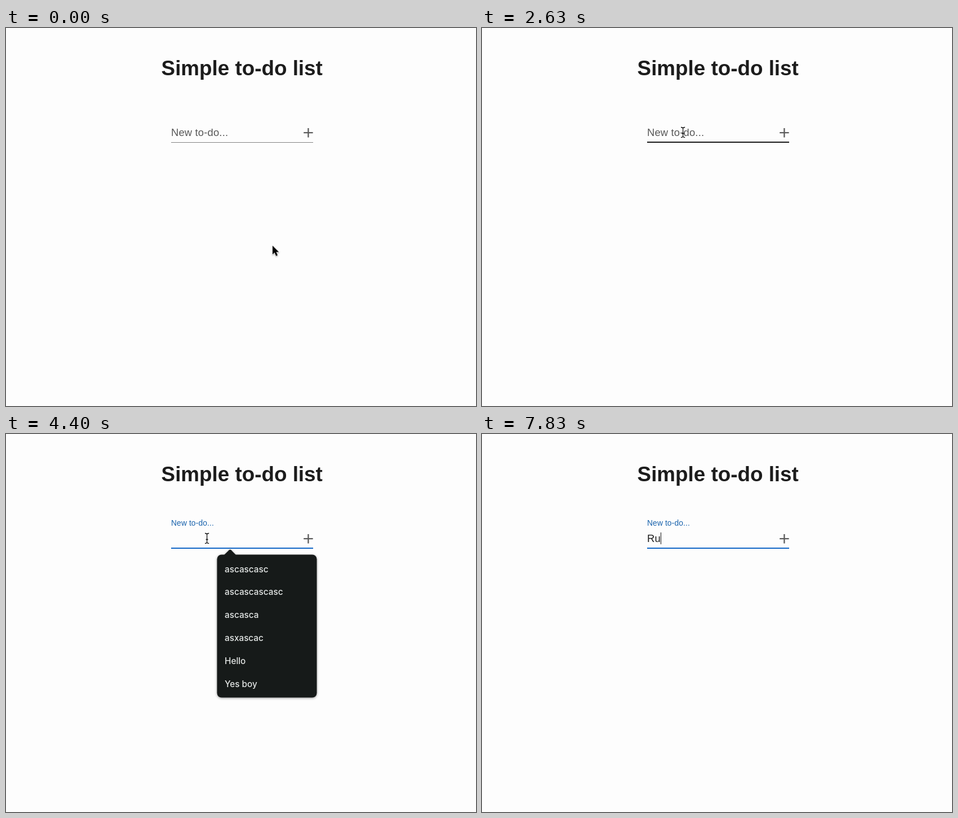
Write an HTML page that moves like this. It is 834 by 672 pixels and loops after 8000 ms.

```html
<!DOCTYPE html>
<html lang="en">
<head>
<meta charset="utf-8">
<title>Simple to-do list</title>
<style>
  html, body { margin: 0; width: 100%; height: 100%; overflow: hidden; background: #fdfdfd; }
  svg { display: block; font-family: "Liberation Sans", Arial, sans-serif; }
  .field { font-size: 18.4px; letter-spacing: 0.00938em; }
  .menu { font: 500 15.3px Inter, sans-serif; fill: #e4e7e6; }
  #popup { filter: drop-shadow(0 1px 2px rgba(0, 0, 0, .4)); }
  #arrow { filter: drop-shadow(0 1px 1px rgba(0, 0, 0, .35)); }
</style>
</head>
<body>
<svg width="834" height="672" viewBox="0 0 834 672">
  <text x="275.6" y="84" font-size="36.8" font-weight="700" fill="#1c1c1c">Simple to-do list</text>

  <text id="label" class="field" y="19.6">New to-do...</text>
  <text id="typed" class="field" x="293" y="192" fill="#1c1c1c"></text>
  <rect id="caret" y="175" width="1" height="21" fill="#111"/>
  <path d="M528.2 186.2h16.4M536.4 178v16.4" stroke="#5c5c5c" stroke-width="2.3"/>
  <rect id="line" x="293" width="252"/>
  <rect id="focusLine" y="202" height="2" fill="#1166c6"/>

  <g id="popup">
    <rect x="374.5" y="214.5" width="177" height="254" rx="8" fill="#161a19"/>
    <path d="M386.5 215.5L396 206.3q1.700-1.500 3.400 0L408.500 215.500z" fill="#161a19"/>
    <g id="items" class="menu"></g>
  </g>

  <path id="arrow" d="M0 0V15.600L3.600 12.300L6.200 18.200L9 17L6.500 11.300H11.200Z"
        fill="#000" stroke="#fff" stroke-width="1.2" paint-order="stroke"/>
  <path id="beam" d="M353 176.500q3.600 0 3.600 2.500V192q0 2.500-3.600 2.500M360.200 176.500q-3.600 0-3.600 2.500M356.600 192q0 2.500 3.600 2.500M354.600 187.500h4"
        fill="none" stroke="#111" stroke-width="1.3"/>
</svg>
<script>
const LOOP = 8000, HOVER = 2430, FOCUS = 2875, TYPE_R = 5565, TYPE_U = 7740;
const LEFT = 293, RIGHT = 545;
// time, x, y of the pointer tip
const POINTER = [
  [30, 473, 387], [200, 467, 370], [850, 414, 251],
  [970, 407, 238], [1300, 365, 187], [1500, 357, 178]
];
const $ = id => document.getElementById(id);
const clamp = v => Math.min(1, Math.max(0, v));
const mix = (a, b, p) => a + (b - a) * p;
const mixColor = (a, b, p) => `rgb(${a.map((v, i) => Math.round(mix(v, b[i], p)))})`;
const show = (id, on) => $(id).setAttribute('visibility', on ? 'visible' : 'hidden');
const set = (id, attrs) => {
  for (const name in attrs) $(id).setAttribute(name, attrs[name]);
};

['ascascasc', 'ascascascasc', 'ascasca', 'asxascac', 'Hello', 'Yes boy'].forEach((word, i) => {
  const item = document.createElementNS('http://www.w3.org/2000/svg', 'text');
  item.textContent = word;
  item.setAttribute('x', 388);
  item.setAttribute('y', 245.500 + i * 40.800);
  $('items').append(item);
});

// cubic-bezier(0, 0, 0.2, 1)
function easeOut(x) {
  let low = 0, high = 1;
  for (let i = 0; i < 20; i++) {
    const s = (low + high) / 2;
    if (0.6 * s * s * (1 - s) + s ** 3 < x) low = s; else high = s;
  }
  return 3 * low * low * (1 - low) + low ** 3;
}

function pointerAt(t) {
  let i = 0;
  while (i < POINTER.length - 2 && t > POINTER[i + 1][0]) i++;
  const [t0, x0, y0] = POINTER[i], [t1, x1, y1] = POINTER[i + 1];
  const p = clamp((t - t0) / (t1 - t0));
  return [mix(x0, x1, p), mix(y0, y1, p)];
}

function draw(t) {
  const hovered = t >= HOVER, focused = t >= FOCUS;
  const focus = easeOut(clamp((t - FOCUS) / 200));
  const hover = clamp((t - HOVER) / 200);

  set('label', {
    transform: `translate(${LEFT} ${mix(172.4, 147.9, focus)}) scale(${mix(1, 0.75, focus)})`,
    fill: mixColor([88, 88, 88], [24, 98, 172], focus)
  });
  set('line', {
    y: hovered ? 202 : 203,
    height: hovered ? 2 : 1,
    fill: mixColor([130, 130, 130], [26, 26, 26], hover)
  });
  const width = (RIGHT - LEFT) * focus;
  set('focusLine', { x: (LEFT + RIGHT - width) / 2, width });

  const typed = t >= TYPE_U ? 'Ru' : t >= TYPE_R ? 'R' : '';
  $('typed').textContent = typed;
  const blinkStart = t >= TYPE_U ? TYPE_U : t >= TYPE_R ? TYPE_R : FOCUS;
  set('caret', { x: [293.3, 306, 317][typed.length] });
  show('caret', focused && Math.floor((t - blinkStart) / 500) % 2 === 0);

  show('popup', focused && !typed);
  set('arrow', { transform: `translate(${pointerAt(t).join(' ')})` });
  show('arrow', !hovered);
  show('beam', hovered && !typed);
}

const start = performance.now();
function tick() {
  draw((performance.now() - start) % LOOP);
  requestAnimationFrame(tick);
}
tick();
</script>
</body>
</html>
```
